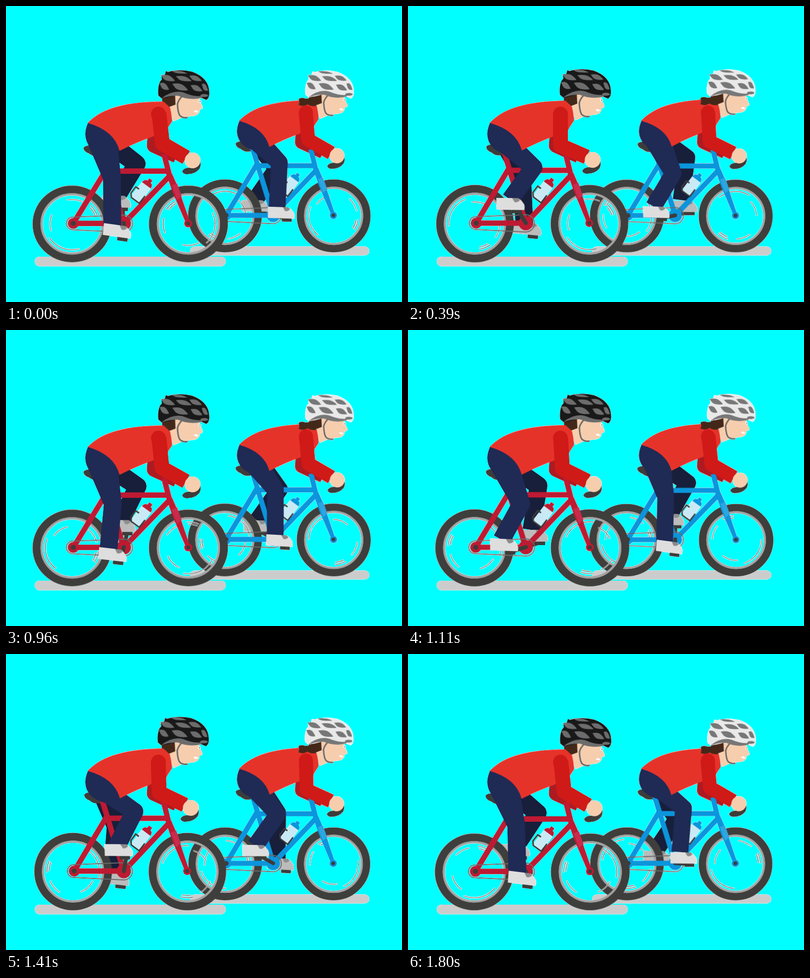
These frames come from a looping animation (800x600 px, 1.83 s). An HTML page without scripts:

```html
<!DOCTYPE html>
<html lang="en">
<head>
<meta charset="utf-8">
<title>Two cyclists</title>
<style>
html, body { margin: 0; width: 100%; height: 100%; overflow: hidden; background: #0ff; }
svg { display: block; width: 800px; height: 600px; }

.red  { --bike: #be1a32; --fork: #c92b4b; --shell: #191919; --vent: #6c6c6c; --d: 0ms; --bob: 0ms; }
.blue { --bike: #0b95dc; --fork: #2ba6e0; --shell: #e9e9e9; --vent: #777; --d: -735ms; --bob: -225ms; }
.near { --e: 0ms; --cloth: #1f2a55; --shoe: #dedede; --tongue: #8a8a8a; }
.far  { --e: -457.5ms; --cloth: #171f3a; --shoe: #bcbcbc; --tongue: #8f8f8f; }

/* thin pale rim around every silhouette */
.scene { filter: drop-shadow(0 0 .5px #fff) drop-shadow(0 0 .4px #fff); }
.tube { fill: none; stroke: var(--bike); stroke-width: 11; stroke-linejoin: round; }
.dark { fill: #3c3c3a; }
.line { fill: none; stroke: #3c3c3a; }
.skin { fill: #f6ceae; }
.hair { fill: #43281a; }
.vent { fill: var(--vent); }
.halo { stroke: #fff; stroke-width: 2.6; }
.ink  { stroke: #444; stroke-width: 1.1; }

.spin { animation: spin 305ms linear infinite; }
.turn, .back, .leg { animation: turn 915ms linear calc(var(--d) + var(--e)) infinite; }
.back { animation-name: back; }
.leg {
  animation-name: pedal;
  fill: var(--cloth); stroke: var(--cloth); stroke-width: 36; stroke-linejoin: round;
  d: path("M215 447L214 348L180 268L208 282L214 348");
}
.squash { transform-origin: 252px 520px; animation: squash 915ms linear var(--d) infinite; }
.reach { animation: reach 915ms linear var(--d) infinite; }
.arm {
  fill: none; stroke: #cf1a18; stroke-width: 30; stroke-linejoin: round;
  d: path("M309 217L316 279L364 307");
  animation: arm 915ms linear var(--d) infinite;
}
.bob { transform-origin: 166px 240px; animation: bob 915ms linear var(--bob) infinite; }

@keyframes spin { to { transform: rotate(360deg); } }
@keyframes turn { from { transform: rotate(85deg); } to { transform: rotate(445deg); } }
@keyframes back {
  0% { transform: rotate(-77deg); }
  25% { transform: rotate(-174deg); }
  75% { transform: rotate(-355deg); }
  100% { transform: rotate(-437deg); }
}
@keyframes pedal {
  8.33%  { d: path("M202 443L217 354L180 268L208 282L217 354"); }
  16.67% { d: path("M191 433L223 356L180 268L208 282L223 356"); }
  25%    { d: path("M188 419L233 350L180 268L208 282L233 350"); }
  33.33% { d: path("M195 405L243 337L180 268L208 282L243 337"); }
  41.67% { d: path("M205 393L253 328L180 268L208 282L253 328"); }
  50%    { d: path("M217 389L258 322L180 268L208 282L258 322"); }
  58.33% { d: path("M230 392L261 317L180 268L208 282L261 317"); }
  66.67% { d: path("M240 401L260 315L180 268L208 282L260 315"); }
  75%    { d: path("M246 412L256 319L180 268L208 282L256 319"); }
  83.33% { d: path("M242 431L244 332L180 268L208 282L244 332"); }
  91.67% { d: path("M231 443L226 343L180 268L208 282L226 343"); }
}
@keyframes squash {
  0%, 5%, 100% { transform: scale(1.0175, .991); }
  45%, 60% { transform: scale(1, 1); }
  75% { transform: scale(1.006, 1); }
  96% { transform: scale(1.014, .992); }
}
@keyframes reach {
  0%, 5%, 100% { transform: translate(4px, 1px); }
  42% { transform: translate(0, 0); }
  75% { transform: translate(1px, 0); }
}
@keyframes arm {
  42% { d: path("M308 222L308 283L361 306"); }
  75% { d: path("M307 218L312 277L362 306"); }
}
@keyframes bob {
  0%, 5%, 100% { transform: rotate(.6deg); }
  40% { transform: rotate(0deg); }
  74% { transform: rotate(-.6deg); }
  96% { transform: rotate(.5deg); }
}
</style>
</head>
<body>
<svg viewBox="0 0 800 600">
  <defs>
    <g id="wheel" fill="none">
      <circle r="70.5" stroke="#3e3e3c" stroke-width="16"/>
      <circle r="60.5" stroke="#a3a3a3" stroke-width="4.5"/>
    </g>
    <g id="arcs" fill="none">
      <circle r="44" pathLength="360" stroke-dasharray="44 316" stroke-dashoffset="-160"/>
      <circle r="53" pathLength="360" stroke-dasharray="74 286" stroke-dashoffset="-73"/>
      <circle r="53" pathLength="360" stroke-dasharray="26 334" stroke-dashoffset="-313"/>
      <circle r="48.5" pathLength="360" stroke-dasharray="22 338" stroke-dashoffset="-316"/>
      <circle r="50" pathLength="360" stroke-dasharray="36 324" stroke-dashoffset="-257"/>
    </g>
    <g id="glint">
      <use href="#arcs" class="halo"/>
      <use href="#arcs" class="ink"/>
    </g>

    <g id="frame">
      <path class="dark" d="M158 285Q163 278 190 281L197 300Q180 307 169 297Q158 293 158 285Z"/>
      <path class="tube" d="M193 292L238 440" stroke-width="12"/>
      <path class="tube" d="M204 333H326M318 298L329 343L238 440H138L205 327"/>
      <path d="M323 341L334 338L346 366L370 438L362 441L335 376Z" fill="var(--bike)"/>
      <path d="M333 362L344 358L353 384L344 392Z" fill="var(--fork)"/>
      <circle cx="138" cy="440" r="11" fill="var(--bike)"/>
      <circle class="dark" cx="138" cy="440" r="5"/>
      <circle cx="366" cy="440" r="8" fill="var(--bike)"/>
      <circle class="dark" cx="366" cy="440" r="4"/>
      <circle cx="238" cy="440" r="14.5" fill="var(--bike)"/>
      <path d="M137 427L238 423A17 17 0 0 1 238 458L137 453A13 13 0 0 1 137 427Z" fill="none" stroke="#6b6b6b" stroke-width="2"/>
      <g transform="translate(274 374) rotate(37)">
        <rect x="-11" y="-19" width="22" height="41" rx="4" fill="#c9eaf5"/>
        <path d="M-11 -15Q-10 -24 -4 -24V-30H4V-24Q10 -24 11 -15Z" fill="var(--bike)"/>
        <path class="line" d="M-7 0H-15V16L-9 23H11V4" stroke-width="3"/>
      </g>
    </g>

    <g id="shoe">
      <rect class="dark" x="2" y="10" width="21" height="9"/>
      <path d="M-29 -12H14Q20 -10 25 -3Q30 2 28 12H-28Z" fill="var(--shoe)"/>
      <path d="M3 -12H15L19 -8Q13 -2 8 -4Z" fill="var(--tongue)"/>
    </g>
    <path id="crank" d="M0 0H29" stroke="#3c3c3a" stroke-width="8" stroke-linecap="round"/>

    <path id="rump" d="M166 236Q156 258 163 274Q172 296 206 303L231 292Q222 252 166 236Z" fill="#1f2a55"/>

    <path id="slit" d="M-16 -6Q0 -9 8 -2Q14 3 16 7Q-4 9 -10 2Z"/>
    <g id="body">
      <path class="hair" d="M314 180L343 178L343 200Q332 208 316 204Z"/>
      <path class="skin" d="M341 178L391 181L390 190Q396 198 397 204Q396 207 391 207L390 213Q386 221 373 221L356 224L338 232L329 203L342 198Z"/>
      <path d="M379 210Q382 216 389 212L384 209Z" fill="#fff"/>
      <circle cx="391" cy="191" r="2.6" fill="#fff"/>
      <circle cx="391.5" cy="191" r="1.2" fill="#555"/>
      <ellipse class="skin" cx="348" cy="187" rx="6" ry="8"/>
      <path d="M355 181Q347 190 346 197Q347 215 351 220Q357 226 367 224" fill="none" stroke="#686868" stroke-width="3"/>
      <path d="M307 180Q305 164 310 152L314 147L313 142L320 137L322 130L326 132Q350 125 375 131Q409 143 410 172Q411 184 404 188L395 184Q370 186 348 178Q328 184 314 186Z" fill="var(--shell)"/>
      <g class="vent">
        <path d="M313 186Q340 164 365 176Q382 182 398 180L394 184Q370 190 347 180Q330 179 313 186Z"/>
        <use href="#slit" transform="translate(351 162)"/>
        <use href="#slit" transform="translate(326 144) scale(.9 .9)"/>
        <use href="#slit" transform="translate(358 145) scale(1 .75)"/>
        <use href="#slit" transform="translate(349 132) scale(1 .4)"/>
        <use href="#slit" transform="translate(382 144) scale(.8 .8)"/>
        <use href="#slit" transform="translate(384 164) scale(.75 .9)"/>
        <use href="#slit" transform="translate(401 162) scale(.4 1)"/>
        <use href="#slit" transform="translate(319 161) scale(.6 1)"/>
        <ellipse cx="400" cy="179" rx="8" ry="3"/>
      </g>
      <path d="M165 237C195 205 245 193 318 192L331 204Q336 226 335 233L327 245L318 262L300 262Q262 276 230 293Q219 252 165 237Z" fill="#e6332a"/>
    </g>

    <g id="hand">
      <path class="dark" d="M352 334Q356 325 372 327Q387 327 386 310Q392 318 387 329Q377 341 360 340Q353 339 352 334Z"/>
      <circle class="skin" cx="373" cy="312" r="16"/>
    </g>
    <path id="sleeve" d="M301 258L299 283L345 304" fill="none" stroke="#ad1b22" stroke-width="29" stroke-linejoin="round"/>
    <circle id="joint" cx="308" cy="219" r="15" fill="#cf1a18"/>
  </defs>

  <g class="scene">
    <rect x="372" y="487.500" width="362" height="18" rx="9" fill="#ccc"/>

    <g class="blue" transform="translate(315.4 9.3) scale(.943)">
      <g class="far">
        <g transform="translate(238 440)"><g class="turn"><use href="#crank"/></g></g>
        <g transform="translate(6 -2)"><path class="leg"/></g>
        <g transform="translate(228 427)"><g class="turn"><g transform="translate(29.5)"><g class="back"><use href="#shoe"/></g></g></g></g>
      </g>
      <g class="squash">
        <g transform="translate(135.5 441)"><use href="#wheel"/><g class="spin"><use href="#glint" transform="rotate(150)"/></g></g>
        <g transform="translate(366.5 441)"><use href="#wheel"/><g class="spin"><use href="#glint" transform="rotate(54)"/></g></g>
      </g>
      <use href="#sleeve"/>
      <g class="squash"><use href="#frame"/></g>
      <g class="near">
        <g transform="translate(238 440)"><g class="turn"><use href="#crank"/></g></g>
        <use href="#rump"/>
        <g transform="translate(3 -1)"><path class="leg"/></g>
        <g transform="translate(226.5 427)"><g class="turn"><g transform="translate(29.5)"><g class="back"><use href="#shoe"/></g></g></g></g>
      </g>
      <g class="bob">
        <use href="#body"/>
        <path class="hair" d="M322 184Q310 191 303 187Q295 186 292 190Q296 196 292 202Q302 207 312 201Q318 206 330 204Z"/>
      </g>
      <path class="arm"/><use href="#joint"/>
      <g class="reach"><use href="#hand"/></g>
    </g>

    <rect x="58" y="508" width="386" height="19.500" rx="9.750" fill="#ccc"/>

    <g class="red">
      <g class="far">
        <g transform="translate(238 440)"><g class="turn"><use href="#crank"/></g></g>
        <g transform="translate(6 -2)"><path class="leg"/></g>
        <g transform="translate(226 426)"><g class="turn"><g transform="translate(29.5)"><g class="back"><use href="#shoe"/></g></g></g></g>
      </g>
      <g class="squash">
        <g transform="translate(135.5 441)"><use href="#wheel"/><g class="spin"><use href="#glint"/></g></g>
        <g transform="translate(366.5 441)"><use href="#wheel"/><g class="spin"><use href="#glint" transform="rotate(-100)"/></g></g>
      </g>
      <use href="#sleeve"/>
      <g class="squash"><use href="#frame"/></g>
      <g class="near">
        <g transform="translate(238 440)"><g class="turn"><use href="#crank"/></g></g>
        <use href="#rump"/>
        <path class="leg"/>
        <g transform="translate(222.5 426.5)"><g class="turn"><g transform="translate(29.5)"><g class="back"><use href="#shoe"/></g></g></g></g>
      </g>
      <g class="bob"><use href="#body"/></g>
      <path class="arm"/><use href="#joint"/>
      <g class="reach"><use href="#hand"/></g>
    </g>
  </g>
</svg>
</body>
</html>
```
